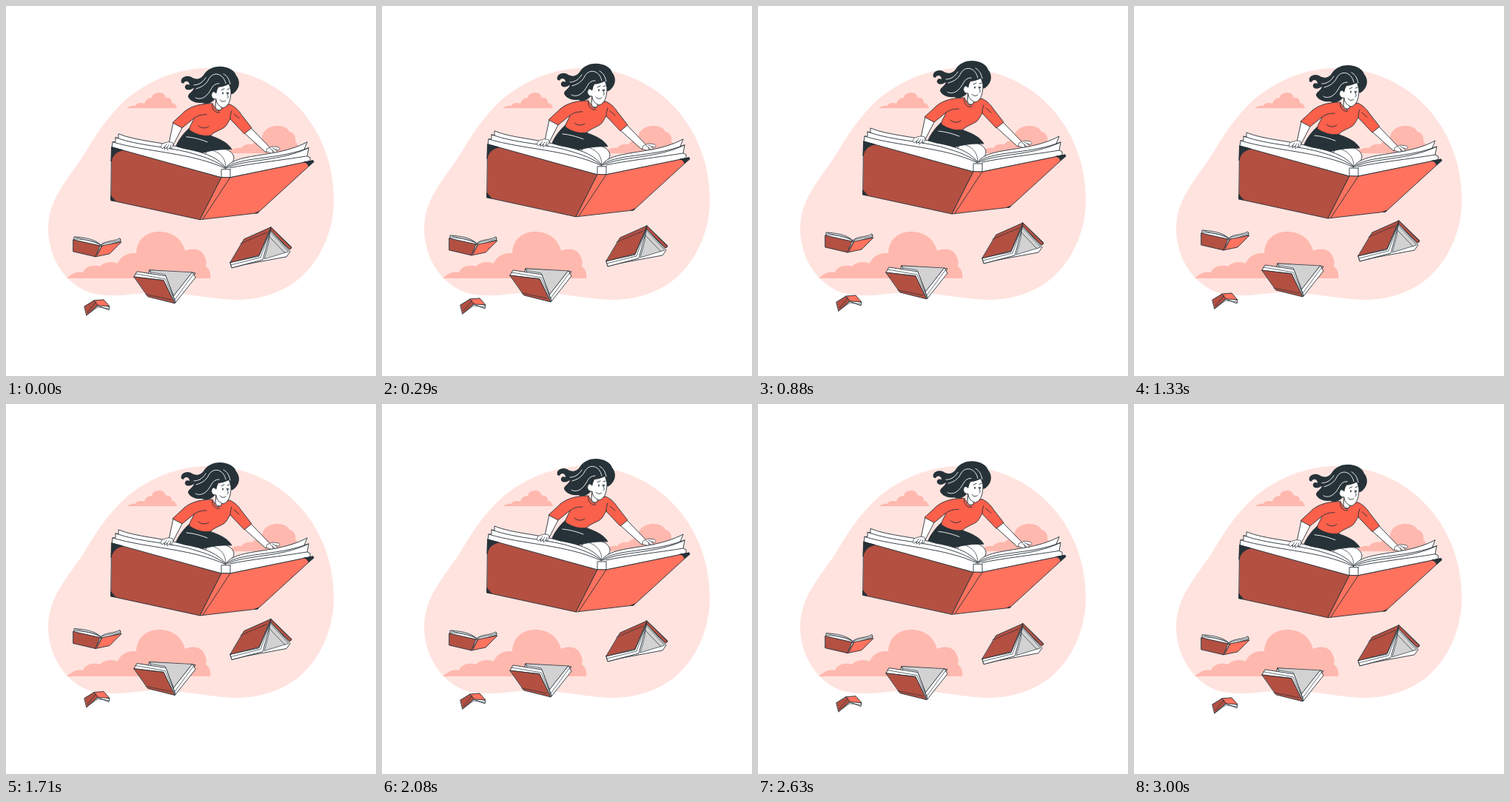
These frames come from a looping animation (500x500 px, 3.04 s). An HTML page:

```html
<!DOCTYPE html>
<html lang="en">
<head>
<meta charset="utf-8">
<title>Flying books</title>
<style>
html, body { margin: 0; height: 100%; overflow: hidden; background: #fff; }
svg { display: block; width: 100%; height: 100%; }
.ink { stroke: #263238; stroke-width: .9; stroke-linejoin: round; stroke-linecap: round; }
.line { fill: none; }
.thin { stroke-width: .7; }
.page { fill: #fff; }
.dark { fill: #263238; }
.brown { fill: #b35042; }
.coral { fill: #ff725e; }
.shirt { fill: #fb604b; }
.grey { fill: #d2d2d2; }
.cloud { fill: #ffb8ae; }
.strand { fill: none; stroke: #fff; stroke-width: .9; stroke-linecap: round; }
</style>
</head>
<body>
<svg viewBox="0 0 500 500">
  <path fill="#ffe3df" d="M272 84C322 84 368 104 401 143C430 178 443 220 443 262C443 300 428 340 398 367C372 389 340 397 312 397C270 396 240 386 200 387C165 389 150 394 120 389C85 381 57 345 57 300C58 262 80 238 100 209C115 187 122 170 145 144C175 108 225 84 272 84Z"/>
  <g class="cloud">
    <path d="M163 138C168 135 171 134 175 135C176 131 183 130 187 132C188 127 192 124 197 124C198 119 202 117 207 117C212 117 215 120 216 124C222 123 224 127 224 131C228 131 230 134 231 138Z"/>
    <path d="M298 199C306 192 314 191 318 192C320 187 328 186 333 187C336 182 342 181 346 182C345 169 354 162 367 162C377 162 381 166 383 170C389 171 392 176 391 183C395 187 396 193 396 199Z"/>
    <path d="M82 368C89 361 97 358 104 360C107 352 118 349 127 352C132 346 143 345 151 348C154 339 163 333 176 334C177 315 190 305 207 305C225 305 238 315 242 331C254 326 265 329 268 338C271 343 271 348 270 352C275 355 277 362 276 368Z"/>
  </g>

  <g class="small">
    <g class="ink">
      <path class="page" d="M303 347L305 354L345 344L357 306L384 329L386 326L358 299Z"/>
      <path class="brown" d="M358 299L386 327L383 329L357 303Z"/>
      <path class="page" d="M325 349L379 339L384 332L357 303L343 339Z"/>
      <path class="grey thin" d="M357 305L382 332L349 342L355 320Z"/>
      <path class="page" d="M303 347L305 354L347 343L357 306L358 301L342 338Z"/>
      <path class="line thin" d="M304 350L344 340L357 304M355 311L377 334"/>
      <path class="brown" d="M322 315L358 299L342 337L303 347Z"/>
      <path class="line thin" d="M317 321L353 306"/>
    </g>
    <g class="ink">
      <path class="page" d="M194 357L256 361L228 402L214 368L193 362Z"/>
      <path class="grey thin" d="M195 357L252 360L227 393L215 363L196 360Z"/>
      <path class="page" d="M252 360L256 367L229 401L226 393Z"/>
      <path class="line thin" d="M254 362L228 397"/>
      <path class="page" d="M173 366L177 359L216 365L229 400L228 402L213 371Z"/>
      <path class="line thin" d="M175 362L215 369L228 399M194 357L196 362"/>
      <path class="brown" d="M173 366L213 371L228 402L192 393Z"/>
      <path class="line thin" d="M189 390L223 397"/>
    </g>
    <g class="ink">
      <path class="page" d="M92 317L92 312C106 313 120 315 128 323C134 317 145 319 154 314L155 318L130 325Z"/>
      <path class="line thin" d="M92 315C108 315 120 319 128 323C137 319 146 320 155 316M94 313C111 317 122 318 128 323"/>
      <path class="brown" d="M91 316L127 324L121 339L91 332Z"/>
      <path class="coral" d="M130 324L156 319L140 335L121 339Z"/>
      <path class="line thin" d="M127 324L130 324M130 324L123 338"/>
    </g>
    <g class="ink">
      <path class="page" d="M109 418L111 416L124 405L139 411L140 407L126 402Z"/>
      <path class="line thin" d="M110 417L124 407L139 409"/>
      <path class="brown" d="M106 406L119 398L125 404L109 418Z"/>
      <path class="coral" d="M119 398L132 397L140 406L125 405Z"/>
      <path class="line thin" d="M122 400L110 414"/>
    </g>
  </g>

  <g class="big">
    <g class="ink">
      <path class="page" d="M226 158L219 191L224 192L239 163ZM322 172L351 198L358 193L331 165Z"/>
      <path class="page" d="M274 194C292 190 306 194 308 205C308 212 301 217 297 219L264 208Z"/>
      <path class="line thin" d="M281 196C292 200 297 208 297 219"/>
      <path class="dark" d="M248 165C239 173 232 183 229 192L252 203C265 198 284 193 305 194C300 185 289 180 275 175Z"/>
      <path class="strand" d="M244 177C255 178 264 181 272 184"/>
      <path class="page" d="M284 124L283 137C286 143 292 142 292 136L293 130Z"/>
      <path class="shirt" d="M278 132C259 132 245 138 238 146L225 158L238 165L254 152C252 158 247 164 248 168C258 175 270 177 277 175C282 169 295 167 298 161C301 157 301 155 303 153L322 173L332 165L318 147C313 139 307 135 302 133L292 137C291 144 283 143 282 137Z"/>
      <path class="line" d="M279 132C277 139 283 146 289 144M254 152C259 148 265 147 271 147M260 162C264 166 270 166 274 163M303 153C303 148 304 145 305 142M308 146L315 152"/>
    </g>
    <path class="dark" d="M237 104C235 97 243 93 250 96C257 101 264 99 268 92C273 85 281 82 289 82C300 82 309 87 311 94C317 101 316 111 309 117C306 120 304 120 303 118L302 108L287 110L283 125C278 132 271 134 265 131C257 132 249 129 246 123C246 118 252 117 254 111C249 114 244 115 242 111C241 107 245 105 248 107C248 102 242 100 240 105Z"/>
    <path class="page" d="M286 112C290 110 297 108 301 106L304 116C304 125 302 135 294 138C288 137 284 131 284 126C278 127 276 120 279 117C281 116 283 117 284 119Z"/>
    <path class="line ink" d="M304 115C304 125 302 135 294 138C288 137 284 131 284 126C278 127 276 120 279 117M298 117C299 121 302 123 299 125M289 127C291 130 295 130 297 128M291 114L295 112M299 113L302 112"/>
    <g class="dark"><ellipse cx="293" cy="118" rx=".9" ry="1.5"/><ellipse cx="300" cy="118" rx=".9" ry="1.5"/></g>
    <path class="strand" d="M297 105C294 91 280 88 274 99C270 107 264 110 257 112M303 106C301 98 299 95 294 92M288 105C276 105 279 117 267 124C263 126 258 126 256 124M270 97C265 105 259 107 254 107"/>

    <g class="ink">
      <path class="page" d="M143 192L144 184L148 184L148 178L152 179L152 173C176 183 213 184 241 193C270 198 287 206 297 219C306 205 333 204 359 199C378 196 394 191 407 184L403 194L409 192L407 203L411 205L411 210L303 232L291 232Z"/>
      <path class="line" d="M148 178C184 191 226 190 260 202C277 207 288 213 297 219M144 184C190 198 250 198 297 220M297 219C315 204 365 208 403 194M299 219C322 207 370 211 409 192M303 219C331 213 371 209 407 203M291 222L291 232M303 221L303 232M291 221L303 221"/>
      <path class="brown" d="M143 191L291 232L262 289L142 263Z"/>
      <path class="coral" d="M303 232L415 209L409 217L340 280L262 289L291 232Z"/>
      <path class="line" d="M303 232L266 288"/>
      <path class="dark" d="M143 191L158 195C149 197 144 202 142 210ZM142 257L148 264L142 263ZM403 211L415 209L416 211L409 217C408 214 406 212 403 211ZM337 280L342 278L340 280Z"/>
      <path class="page thin" d="M219 184L212 186C209 188 209 192 211 193L215 190L214 194L218 191L218 195L222 191L223 194L226 188L225 185Z"/>
      <path class="page thin" d="M353 193L360 190L368 191C371 193 370 195 368 195L364 194L367 198L363 198L360 195L361 199L357 199L352 197Z"/>
      <path class="line thin" d="M215 190L217 187M218 191L220 188M222 191L223 188M364 194L360 192M360 195L357 193"/>
    </g>
  </g>
</svg>
<script>
const loop = 3040, lead = 20, height = 10;
const big = document.querySelector('.big');
const small = document.querySelector('.small');

// Linear rise and fall over one period.
const bob = (t, period) => {
  const p = (t + lead) % period / period;
  return -height * (1 - Math.abs(2 * p - 1));
};
const lift = (part, y) => part.setAttribute('transform', `translate(0 ${y})`);

function draw() {
  const t = performance.now() % loop;
  lift(big, bob(t, 1500));
  lift(small, bob(t, 3000));
  requestAnimationFrame(draw);
}
draw();
</script>
</body>
</html>
```
